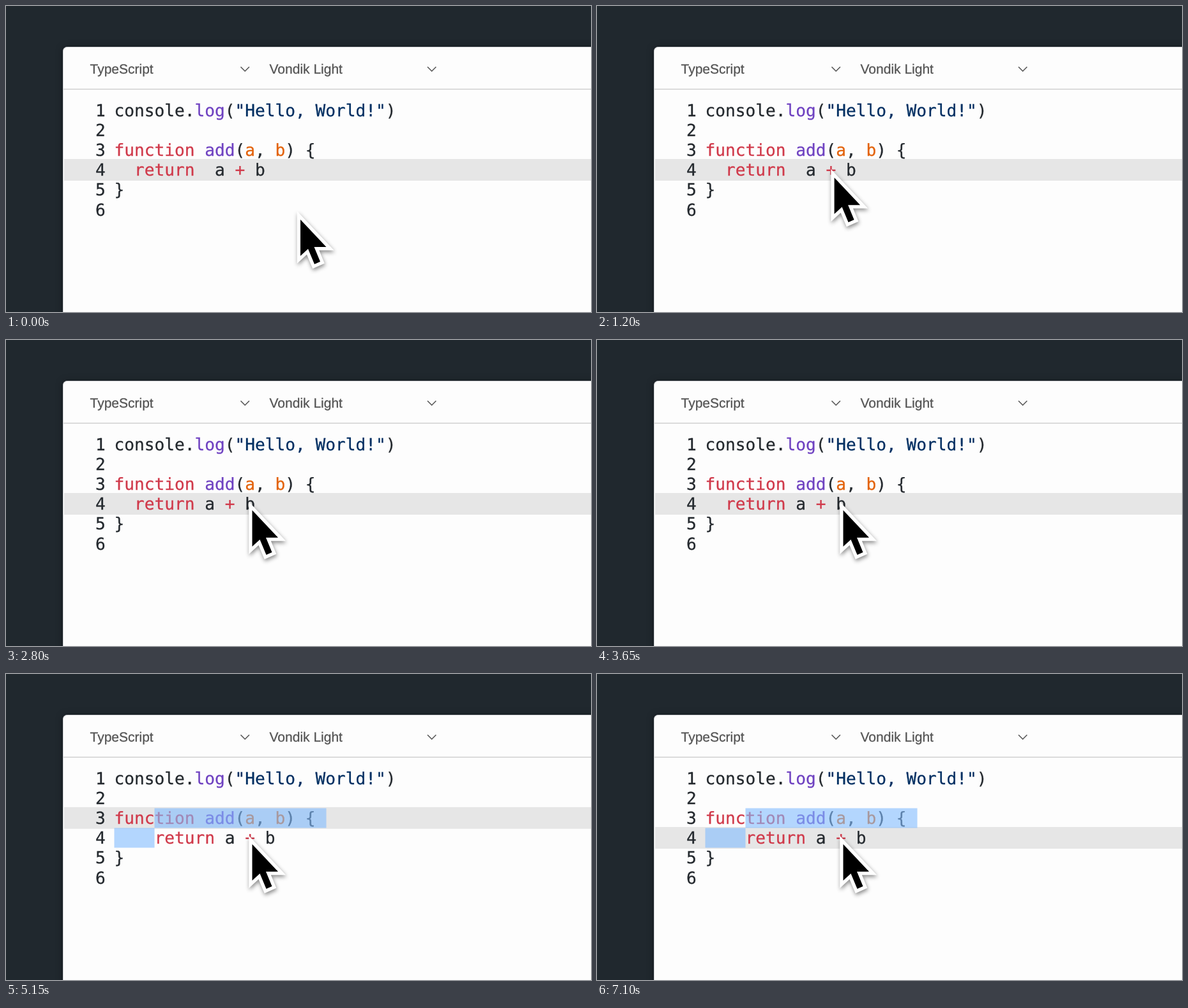
An HTML page that plays this animation: 916x480 px, repeating every 7.15 s.

```html
<!DOCTYPE html>
<html lang="en">
<head>
<meta charset="utf-8">
<title>Editor indentation</title>
<style>
  html, body { margin: 0; width: 100%; height: 100%; overflow: hidden; background: #20282e; }
  svg { display: block; }
  text {
    white-space: pre; text-rendering: geometricPrecision;
    color: #24292e; font: 26.16px "DejaVu Sans Mono", monospace;
  }
  text, tspan { fill: currentColor; stroke: currentColor; stroke-width: .3; }
  .menu { color: #555; font: 21px "Liberation Sans", Arial, sans-serif; }
  .key { color: #d0394a; }
  .name { color: #6f42c1; }
  .param { color: #e36209; }
  .str { color: #032f62; }
  .line { fill: none; stroke: #555; stroke-width: 1.6; }
  #panel { filter: drop-shadow(0 1px 6px rgba(0, 0, 0, .35)); }
  #pointer { filter: drop-shadow(1px 3px 3px rgba(0, 0, 0, .45)); }
  #selection { fill: rgba(130, 188, 255, .6); }
</style>
</head>
<body>
<svg width="916" height="480" viewBox="0 0 916 480">
  <rect id="panel" x="89.5" y="64.5" width="860" height="450" rx="6" fill="#fdfdfd" stroke="#d4d6d8"/>
  <path d="M90 130.5H916" stroke="#cfcfcf" stroke-width="1.4"/>
  <text class="menu" x="131.5" y="106">TypeScript</text>
  <text class="menu" x="412.5" y="106">Vondik Light</text>
  <path class="line" d="M367.5 95.5l6.7 6.7 6.7-6.7M660 95.5l6.7 6.7 6.7-6.7"/>
  <rect id="active" x="91" width="825" height="34" fill="#e6e6e6"/>
  <g id="numbers"></g>
  <text x="169.5" y="172.5">console.<tspan class="name">log</tspan>(<tspan class="str">"Hello, World!"</tspan>)</text>
  <text id="head" y="234.9"><tspan class="key">function</tspan> <tspan class="name">add</tspan>(<tspan class="param">a</tspan>, <tspan class="param">b</tspan>) {</text>
  <text id="body" y="266.1"><tspan class="key">return</tspan><tspan id="gap"> </tspan>a <tspan class="key">+</tspan> b</text>
  <text x="169.5" y="297.3">}</text>
  <path id="selection"/>
  <path id="pointer" d="M0 0V57L12 46L22 70L31 66L21.500 43H40.500Z" stroke="#fff" stroke-width="10.5" paint-order="stroke"/>
</svg>
<script>
const LOOP = 7150, LEFT = 169.5, CHAR = 15.75, LINE = 31.2;
const $ = id => document.getElementById(id);
const col = n => LEFT + n * CHAR;

// Each state holds from its start time: line indents, spaces before "a", selection, active line
const states = [
  { at: 0, head: 0, body: 2, gap: 2, active: 4 },
  { at: 2300, head: 0, body: 2, gap: 1, active: 4 },
  { at: 4000, head: 0, body: 4, gap: 1, active: 4 },
  { at: 5000, head: 0, body: 4, gap: 1, active: 3, selected: true },
  { at: 5400, head: 2, body: 6, gap: 1, active: 4, selected: true },
  { at: 6400, head: 0, body: 4, gap: 1, active: 4, selected: true }
];

// Pointer stops: time, x, y
const stops = [
  [0, 461, 335], [150, 457, 334], [700, 355, 300], [850, 348, 292],
  [1300, 375, 266], [1700, 375, 266], [2000, 385.5, 267], [LOOP, 385.5, 267]
];

for (let n = 1; n <= 6; n++)
  $("numbers").innerHTML += `<text x="140" y="${172.5 + (n - 1) * LINE}">${n}</text>`;

function pointerAt(t) {
  const i = stops.findIndex(s => s[0] > t);
  const [t0, x0, y0] = stops[i - 1], [t1, x1, y1] = stops[i];
  const p = (t - t0) / (t1 - t0), e = p * p * (3 - 2 * p);
  return [x0 + (x1 - x0) * e, y0 + (y1 - y0) * e];
}

function draw(t) {
  const s = states.filter(s => s.at <= t).pop();
  $("head").setAttribute("x", col(s.head));
  $("body").setAttribute("x", col(s.body));
  $("gap").textContent = " ".repeat(s.gap);
  $("active").setAttribute("y", 240 - (4 - s.active) * LINE);
  $("selection").setAttribute("d", s.selected
    ? `M${col(s.head + 4)} 210.5H${col(s.head + 20) + 17}V241.5H${col(s.head + 4)}Z
       M${LEFT} 241.5H${col(s.body)}V272.5H${LEFT}Z`
    : "");
  $("pointer").setAttribute("transform", `translate(${pointerAt(t)})`);
}

const start = performance.now();
function tick() {
  const t = (performance.now() - start) % LOOP;
  draw(Math.floor(t / 50) * 50);
  requestAnimationFrame(tick);
}
tick();
</script>
</body>
</html>
```
